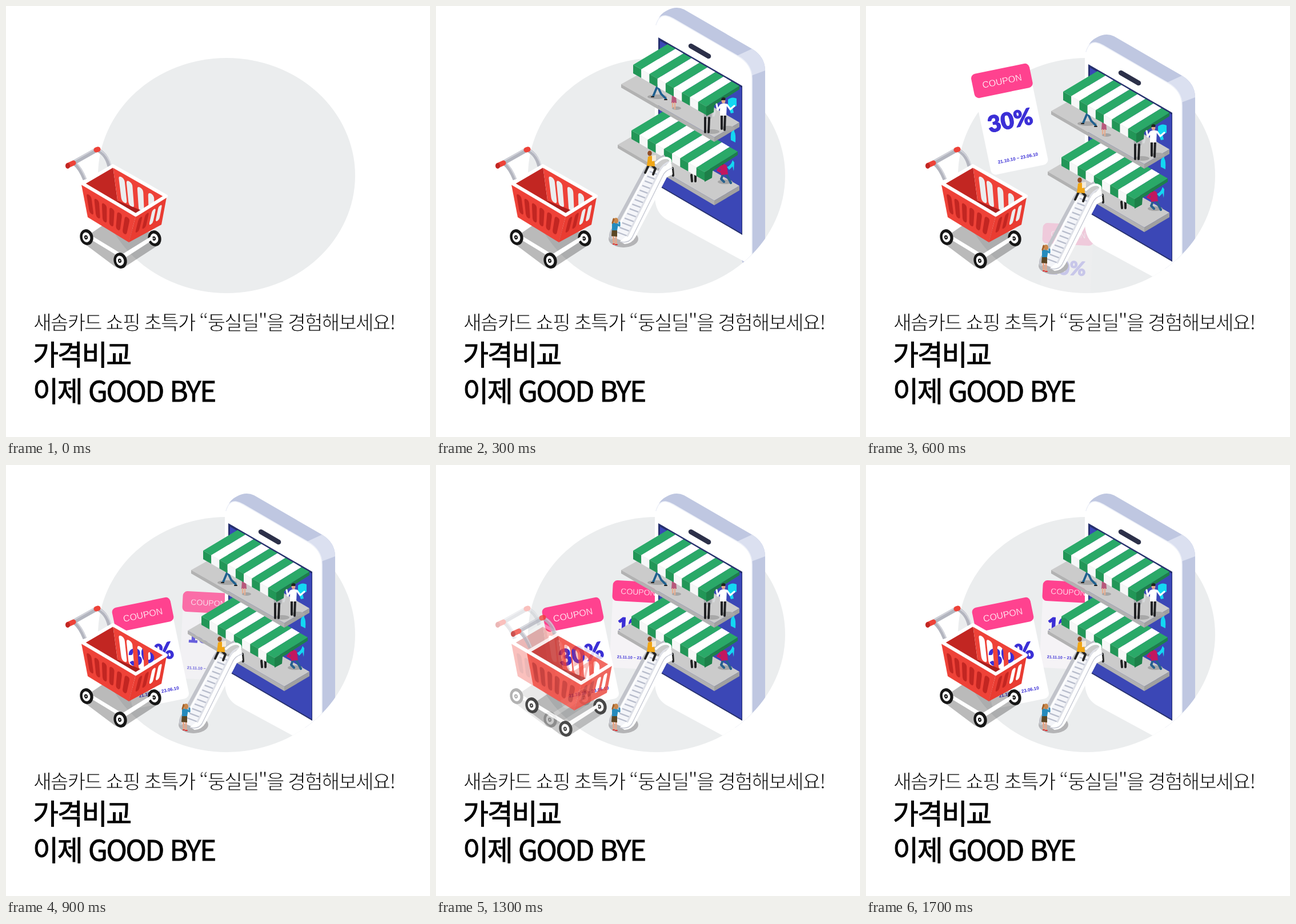
An HTML page for the animation above (5700 ms loop, 742 by 755 pixels).

```html
<!DOCTYPE html>
<html lang="ko">
<head>
<meta charset="utf-8">
<title>Shopping promo</title>
<style>
html, body { margin: 0; width: 100%; height: 100%; overflow: hidden; background: #fff; }
svg { display: block; width: 742px; height: 755px; }
.ko { font-family: "Noto Sans CJK KR", "Noto Sans CJK", sans-serif; white-space: pre; }
.lead { font-size: 34.5px; letter-spacing: -2.05px; stroke: #fff; stroke-width: 1; }
.head { font-size: 49px; letter-spacing: -2.3px; stroke: #000; stroke-width: .9; }
.tag { font-family: "Liberation Sans", Arial, sans-serif; fill: #fff; stroke: #ff428f; stroke-width: .3; text-anchor: middle; }
.rate { font-family: Lato, sans-serif; font-weight: 900; fill: #3b2fd6; stroke: #3b2fd6; stroke-width: 1; stroke-linejoin: round; text-anchor: middle; }
.date { font-family: "Liberation Sans", Arial, sans-serif; font-weight: 700; fill: #3b2fd6; text-anchor: middle; }
</style>
</head>
<body>
<svg id="stage" viewBox="0 0 742 755" xmlns="http://www.w3.org/2000/svg"></svg>
<script>
const STEP = 100, LOOP = 5700;
const GREEN = '#2aa968', GREEN_DARK = '#229657', RED = '#ee4238', DEEP = '#c22622';

const shape = (d, fill, more = '') => `<path d="${d}" fill="${fill}" ${more}/>`;
const line = (d, color, width, cap = 'round') =>
  `<path d="${d}" fill="none" stroke="${color}" stroke-width="${width}" stroke-linecap="${cap}" stroke-linejoin="round"/>`;
const oval = (x, y, rx, ry, fill) => `<ellipse cx="${x}" cy="${y}" rx="${rx}" ry="${ry}" fill="${fill}"/>`;
const ring = points => 'M' + points.map(p => p.join(' ')).join('L') + 'Z';
const poly = (points, fill) => shape(ring(points), fill);
const group = (body, more) => `<g ${more}>${body}</g>`;
const clip = (id, d) => `<clipPath id="${id}"><path d="${d}"/></clipPath>`;
const mix = (a, b, k) => [a[0] + (b[0] - a[0]) * k, a[1] + (b[1] - a[1]) * k];
const inQuad = ([tl, tr, br, bl], u, v) => mix(mix(tl, tr, u), mix(bl, br, u), v);

// Rounded slot inside a four-cornered wall
function slot(quad, u0, u1, v0, v1) {
  const p = (u, v) => inQuad(quad, u, v).map(n => n.toFixed(1)).join(' ');
  const r = .1, um = (u0 + u1) / 2;
  return `M${p(u0, v0 + r)}Q${p(u0, v0)} ${p(um, v0)}Q${p(u1, v0)} ${p(u1, v0 + r)}` +
    `L${p(u1, v1 - r)}Q${p(u1, v1)} ${p(um, v1)}Q${p(u0, v1)} ${p(u0, v1 - r)}Z`;
}

function wheel(x, y) {
  return group(oval(0, 0, 11.5, 14, '#161616') + oval(-.5, 0, 6.8, 8.8, '#fff') +
    oval(-1, 0, 3, 3.8, '#161616') + oval(-1, 0, 1.1, 1.4, '#ddd'),
    `transform="translate(${x} ${y}) rotate(-14)"`);
}

function cart() {
  const back = [[187, 281], [280, 333], [278, 392], [196, 346]];
  const left = [[132, 313], [227, 368], [215, 414], [143, 370]];
  const right = [[227, 368], [281, 335], [272, 383], [215, 414]];
  const backSlots = [.09, .24, .45, .66].map(u => slot(back, u, u + .115, .17, .87)).join('');
  const leftSlots = [0, 1, 2, 3, 4, 5].map(i => slot(left, .07 + i * .15, .165 + i * .15, .2, .81)).join('');
  const [r1, r2, r3, r4] = [.14, .35, .57, .77].map(u => slot(right, u, u + .12, .18, .75));
  return shape('M130 411L171 383L250 396L271 416L208 457Q199 462 190 456Z', '#000', 'opacity=".27"') +
    line('M143 402L199 436M204 440L258 405', '#fff', 6.5) +
    wheel(260, 407) + line('M204 438L254 407', '#fff', 6) + wheel(141, 405) + wheel(200, 446) +
    line('M120 276Q130 284 138 304M160 252Q176 259 181 281', '#b3b5bf', 7, 'butt') +
    line('M122 274Q132 283 140 303M162 251Q178 259 184 280', '#d4d5dc', 2, 'butt') +
    line('M112 278L160 251', '#b3b5bf', 8) + line('M116 273L156 250', '#d4d5dc', 2) +
    line('M109 279L118 275M158 252L161 251', RED, 9) + oval(108, 280, 4, 5, DEEP) +
    poly([[136, 311], [187, 281], [196, 347]], DEEP) +
    group(shape(ring(back) + backSlots, RED, 'fill-rule="evenodd"'), 'clip-path="url(#basket)"') +
    poly([[195, 341], [239, 359], [227, 367], [194, 348]], '#a91f1d') +
    shape(ring(left), RED) + shape(leftSlots, DEEP) +
    shape(ring(right) + r3 + r4, '#e93c32', 'fill-rule="evenodd"') + shape(r1 + r2, DEEP) +
    line('M134 311L187 280L280 333L227 366Z', '#fff', 6);
}

// Everything in a coupon is placed around the middle of its coloured tab
function coupon(c) {
  const { w, h, deep, tag, rate, date } = c;
  return `<rect x="${-w / 2 + 1}" y="0" width="${w - 2}" height="${deep}" rx="9" fill="${c.paper}"/>` +
    `<rect x="${-w / 2}" y="${-h / 2}" width="${w}" height="${h}" rx="8" fill="#ff428f"/>` +
    `<text class="tag" y="${tag * .38}" font-size="${tag}">COUPON</text>` +
    `<text class="rate" y="${c.rateY}" font-size="${rate}">${c.off}</text>` +
    `<text class="date" y="${c.dateY}" font-size="${date}">${c.days}</text>`;
}

function awning() {
  const A = [405, 114], B = [531, 187], C = [473, 223], D = [345, 150], n = 9;
  const drop = ([x, y]) => [x, y + 15];
  let out = '';
  for (let i = 0; i < n; i++) {
    const a = i / n, b = (i + 1) / n, green = i % 2 === 0;
    const p = mix(D, C, a), q = mix(D, C, b);
    out += poly([mix(A, B, a), mix(A, B, b), q, p], green ? GREEN : '#fff') +
      poly([p, q, drop(q), drop(p)], green ? GREEN_DARK : '#f6f7f7');
  }
  return out + poly([C, B, [531, 193], [487, 221], [486, 233], [473, 240]], '#1d8049');
}

function slab(tip, back, right, front) {
  const t = 8, down = ([x, y]) => [x, y + t];
  return poly([tip, back, right, front], '#cbcbcb') +
    poly([tip, front, down(front), [tip[0], tip[1] + 6]], '#b2b2b2') +
    poly([front, right, down(right), down(front)], '#a0a0a0');
}

function shoppers() {
  return oval(387, 206, 17, 4, '#a5a5a5') + line('M388 186L380 205M388 188L394 201L402 209', '#1f6090', 3.8) +
    line('M377 206h4M400 211h4', '#222', 2) +
    oval(421, 226, 8, 3, '#a5a5a5') + poly([[413, 203], [420, 203], [421, 217], [412, 217]], '#b8587c') +
    line('M414 217L414 224M418 217L418 227', '#e6ad90', 2.4) +
    oval(483, 267, 13, 4, '#a8a8a8') + oval(511, 261, 12, 4, '#a8a8a8') +
    poly([[468, 222], [484, 220], [482, 244], [469, 245]], '#a9adb0') +
    line('M471 243L471 268M478 243L477 268', '#202124', 4) +
    line('M482 223L488 232L486 239', '#d9dbdd', 3.5);
}

function seller() {
  return line('M500 236L500 262M506 236L505 264', '#202124', 4) +
    shape('M497 220Q503 215 509 219L508 239H497Z', '#fff') +
    line('M498 221L493 229L491 219M509 220L515 228L522 222', '#fff', 3.2) +
    oval(503, 213, 3.4, 4.5, '#e2a98c') + shape('M499 212Q499 207 504 207Q508 208 506 212Z', '#222');
}

function lowerPeople() {
  return line('M414 331L415 344M408 331L409 339', '#222', 4) +
    line('M447 343L448 354M454 337L454 354', '#222', 4) +
    oval(506, 355, 13, 4, '#a5a5a5') + line('M504 338L499 350L504 355M506 338L511 347L516 357', '#27618d', 4) +
    shape('M497 327Q505 321 509 327L511 342L499 343Z', '#c2185f') + line('M499 328L493 335L499 338', '#c2185f', 3.5) +
    oval(500, 322, 3.5, 4, '#6d3722');
}

function icons() {
  const cyan = '#13d7f2';
  return shape('M511 211Q518 205 526 209V222L519 225L521 234L516 235L511 222Z', cyan) +
    shape('M518 258H522V267Q525 271 524 286L516 282Q515 270 518 266Z', cyan) +
    shape('M509 329Q516 327 519 317L522 321L521 336L519 328L513 334Z', cyan);
}

function escalator() {
  let steps = '';
  for (let i = 0; i < 14; i++) {
    const [x, y] = mix([317, 443], [374, 337], i / 13);
    steps += line(`M${x} ${y}l21 8`, '#b8bdcc', 2.4, 'butt');
  }
  return oval(328, 455, 26, 15, '#b4b4b6') +
    poly([[310, 452], [370, 330], [398, 338], [335, 462]], '#f4f5f9') + steps +
    line('M306 453Q305 444 311 437L366 335Q372 324 384 321L398 311', '#c1c3ca', 6) +
    line('M309 453L370 338', '#fff', 2.5) +
    shape('M322 459L337 447L392 337Q397 325 412 323L414 342L404 347L349 452Q343 463 330 464Z', '#fff') +
    line('M323 460Q337 463 343 453L396 346Q401 334 414 331', '#c7cad4', 1.5) +
    line('M335 450L390 338Q396 324 409 320', '#dfe1e8', 3) +
    line('M385 322Q399 309 408 315Q414 319 405 326', '#fff', 4);
}

function riders() {
  return line('M373 324L366 339M376 324L384 332L380 342', '#252525', 4) +
    shape('M371 311Q378 307 382 313L383 328L369 327Z', '#f0a616') + oval(374, 305, 3.8, 4.5, '#8e4d28') +
    poly([[378, 309], [385, 308], [385, 318], [378, 319]], '#f4ead9') +
    line('M310 447L311 463M315 447L315 464', '#e5a78a', 3) + line('M310 464h2M314 465h3', '#d33', 2) +
    poly([[308, 438], [317, 438], [317, 451], [307, 450]], '#5c4725') +
    shape('M308 428Q314 424 319 429L317 440H308Z', '#258bbd') + line('M317 430L321 432L321 426', '#258bbd', 3) +
    oval(315, 423, 4, 5, '#c98749') + line('M311 420L309 427', '#a2612a', 3);
}

function phone() {
  return shape('M386 80Q389 62 404 55Q420 46 434 53L553 122Q576 136 576 160V520H545Z', '#bfc7e1') +
    shape('M527 134L553 122Q576 136 576 160L552 169Q548 147 527 134Z', '#dbe0f0') +
    shape('M383 94Q383 64 400 64Q407 64 415 69L529 135Q553 149 553 174V502L404 421Q383 409 383 380Z', '#fff') +
    line('M385 80Q390 63 402 64Q408 65 415 69L529 135Q553 149 553 174V500', '#edf0f8', 1.5) +
    line('M446 117L477 135', '#2c3049', 8.5) +
    poly([[389, 102], [536, 187], [536, 448], [389, 362]], '#26306e') +
    poly([[392, 108], [535, 190], [535, 445], [389, 360]], '#3b47b6') + icons() +
    slab([318, 290], [361, 265], [531, 362], [487, 388]) + lowerPeople() +
    group(awning(), 'transform="translate(-3 115)"') +
    slab([324, 184], [372, 157], [531, 251], [487, 277]) + shoppers() + awning() + seller() +
    escalator() + riders();
}

const big = { w: 104, h: 43, deep: 159, paper: '#fff', tag: 16, rate: 40, rateY: 85, off: '30%',
  date: 8, dateY: 141, days: '21.10.10 ~ 23.06.10' };
const small = { w: 90, h: 36, deep: 135, paper: '#f5f3f6', tag: 14, rate: 34, rateY: 71, off: '10%',
  date: 7, dateY: 118, days: '21.11.10 ~ 23.06.10' };

const stage = document.getElementById('stage');
stage.innerHTML =
  clip('floor', 'M0 0H742V297H611A225 206 0 0 1 161 297H0Z') +
  clip('basket', 'M187 280L280 333L227 367L194 347Z') +
  oval(386, 297, 225, 206, '#ebedee') +
  group(group(coupon(small), 'id="small"') + group(coupon(big), 'id="big"') + group(phone(), 'id="phone"'),
    'clip-path="url(#floor)"') +
  group(cart(), 'id="home"') + group(cart(), 'id="ahead" transform="translate(27 16)"') +
  '<text class="ko lead" x="48" y="566.5">새솜카드 쇼핑 초특가 “둥실딜"을 경험해보세요!</text>' +
  '<text class="ko head" x="47" y="629">가격비교</text>' +
  '<text class="ko head" x="47" y="693">이제 GOOD BYE</text>';

const part = id => document.getElementById(id);
const nodes = Object.fromEntries(['small', 'big', 'phone', 'home', 'ahead'].map(id => [id, part(id)]));
const pick = (keys, i) => keys[Math.max(0, Math.min(i, keys.length - 1))];
const place = (node, x, y, turn = 0) => node.setAttribute('transform', `translate(${x} ${y}) rotate(${turn})`);

function draw(time) {
  const k = Math.floor(time % LOOP / STEP);
  place(nodes.phone, 0, pick([480, 345, 173, -47, 0], k));
  const lift = pick([320, 207, 38, -131, -80, -25, 0], k - 3);
  place(nodes.big, 239.5 + Math.min(0, lift) / 80, 262 + lift, -11.7);
  place(nodes.small, 354, 222 + pick([230, 178, 125, 72, 19, 4, 0], k - 5), 3);
  nodes.small.setAttribute('opacity', pick([0, .2, .38, .57, .75, .92, 1], k - 5));
  nodes.home.setAttribute('opacity', pick([1, .33, 0, 0, .33, 1], k - 12));
  nodes.ahead.setAttribute('opacity', pick([0, .78, 1, 1, .78, 0], k - 12));
}

const start = performance.now();
function tick() {
  draw(performance.now() - start);
  requestAnimationFrame(tick);
}
tick();
</script>
</body>
</html>
```
